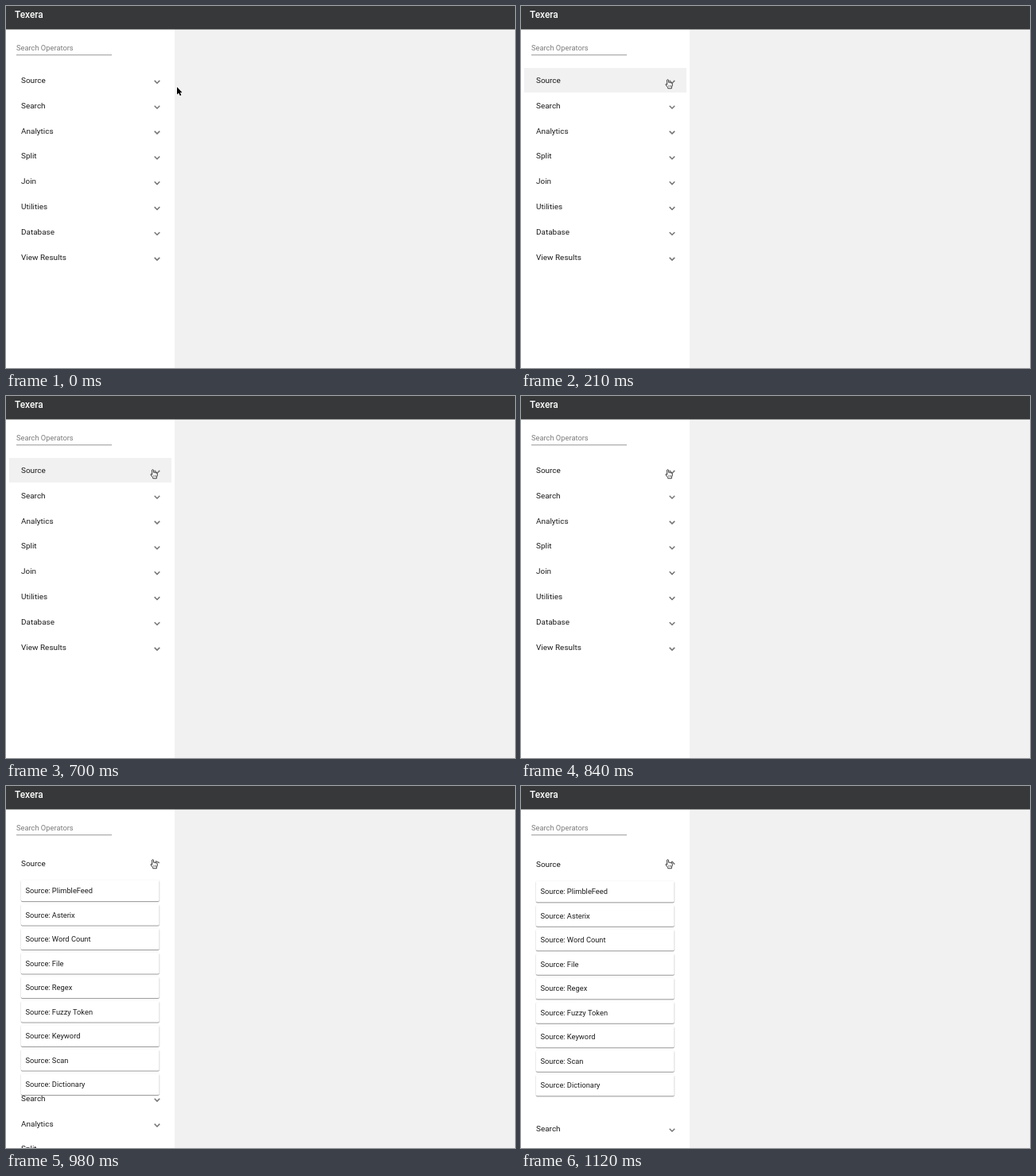
These frames come from a looping animation (640 by 456 pixels, 1.75 s). An HTML page with a canvas:

```html
<!DOCTYPE html>
<html lang="en">
<head>
<meta charset="utf-8">
<title>Operator panel</title>
<style>
  html, body { margin: 0; width: 100%; height: 100%; overflow: hidden; }
  canvas { display: block; }
</style>
</head>
<body>
<canvas id="stage" width="640" height="456"></canvas>
<script>
const ctx = document.getElementById('stage').getContext('2d');
const LOOP = 1750, STEP = 70;
const groups = ['Source', 'Search', 'Analytics', 'Split', 'Join', 'Utilities', 'Database', 'View Results'];
const operators = ['PlimbleFeed', 'Asterix', 'Word Count', 'File', 'Regex', 'Fuzzy Token', 'Keyword', 'Scan', 'Dictionary'];

const arrowPath = new Path2D('M0 0V9.6L2.2 7.6L3.8 11L5.4 10.3L3.9 7H6.6Z');
const handPath = new Path2D('M2.6 1.2q.9-1.1 1.8 0l.4 3.3q1-.6 1.6.2q1-.5 1.5.3q1.4-.2 1.4 1.2v2l-.9 2v1.6h-4.6l-.4-1.4l-2.6-3.6q.3-1.3 2 .3z');
const knucklePath = new Path2D('M4.7 7.6v2.4m1.5-2.4v2.4m1.5-2.4v2.4');
const chevronPath = new Path2D('M-3.3 .3L0 3.6L3.3 .3');

// Material standard easing: cubic-bezier(.4, 0, .2, 1)
function ease(x) {
  if (x <= 0) return 0;
  if (x >= 1) return 1;
  let lo = 0, hi = 1, s;
  for (let i = 0; i < 24; i++) {
    s = (lo + hi) / 2;
    const bx = 1.2 * (1 - s) ** 2 * s + 0.6 * (1 - s) * s * s + s ** 3;
    if (bx < x) lo = s; else hi = s;
  }
  return 3 * (1 - s) * s * s + s ** 3;
}

function rect(x, y, w, h, color) {
  ctx.fillStyle = color;
  ctx.fillRect(x, y, w, h);
}

function text(str, x, y, size, color, weight = 400) {
  ctx.font = `${weight} ${size}px Roboto, sans-serif`;
  ctx.fillStyle = color;
  ctx.fillText(str, x, y);
}

function chevron(y, turn) {
  ctx.save();
  ctx.translate(190, y);
  ctx.rotate(turn * Math.PI);
  ctx.strokeStyle = '#757575';
  ctx.lineWidth = 1.5;
  ctx.stroke(chevronPath);
  ctx.restore();
}

function card(label, y) {
  const shape = new Path2D();
  shape.roundRect(19, y - 13.4, 173.6, 26.4, 1.4);
  ctx.save();
  ctx.fillStyle = '#fff';
  for (const [dy, blur, alpha] of [[0.7, 2, 0.2], [1, 0.8, 0.32]]) {
    ctx.shadowColor = `rgba(0,0,0,${alpha})`;
    ctx.shadowOffsetY = dy;
    ctx.shadowBlur = blur;
    ctx.fill(shape);
  }
  ctx.restore();
  text('Source: ' + label, 24.5, y + 3.2, 9.3, '#1c1c1c');
}

function cursor(x, y, isHand) {
  ctx.save();
  ctx.lineJoin = 'round';
  if (isHand) {
    ctx.translate(x - 3, y);
    ctx.fillStyle = '#fff';
    ctx.fill(handPath);
    ctx.strokeStyle = '#222';
    ctx.lineWidth = 0.9;
    ctx.stroke(handPath);
    ctx.lineWidth = 0.5;
    ctx.stroke(knucklePath);
  } else {
    ctx.translate(x, y);
    ctx.strokeStyle = '#fff';
    ctx.lineWidth = 1.4;
    ctx.stroke(arrowPath);
    ctx.fillStyle = '#000';
    ctx.fill(arrowPath);
  }
  ctx.restore();
}

function draw(now) {
  const t = Math.floor((now % LOOP) / STEP) * STEP;
  const open = ease((t - 845) / 225);
  const move = Math.min(t / 210, 1);
  const pointer = { x: 215 - 31 * move, y: 102 - 10 * move };
  const inside = pointer.x < 208;

  rect(0, 0, 640, 456, '#f1f1f1');
  rect(0, 0, 212, 456, '#fff');
  rect(0, 0, 640, 29.5, '#373839');
  text('Texera', 11, 15.2, 11.9, '#fff', 500);
  text('Search Operators', 13, 56.3, 9.3, '#7c7c7c');
  rect(13, 61.3, 120, 0.9, '#8c8c8c');
  if (inside && t < 840) rect(4, 78, 204, 31, '#f1f1f1');

  const rows = groups.map((_, i) => 93.3 + 31.85 * i + open * (i ? 306 : 5.3));
  groups.forEach((name, i) => text(name, 19, rows[i] + 3.5, 9.96, '#1c1c1c'));
  if (open > 0) {
    const top = rows[0] + 29.3 + 5.3 * open;
    operators.forEach((name, i) => card(name, top + 30.5 * i));
  }
  rows.forEach((y, i) => chevron(y + 0.3, i ? 0 : open));
  cursor(pointer.x, pointer.y, inside);
}

function tick() {
  draw(performance.now());
  requestAnimationFrame(tick);
}
tick();
</script>
</body>
</html>
```
